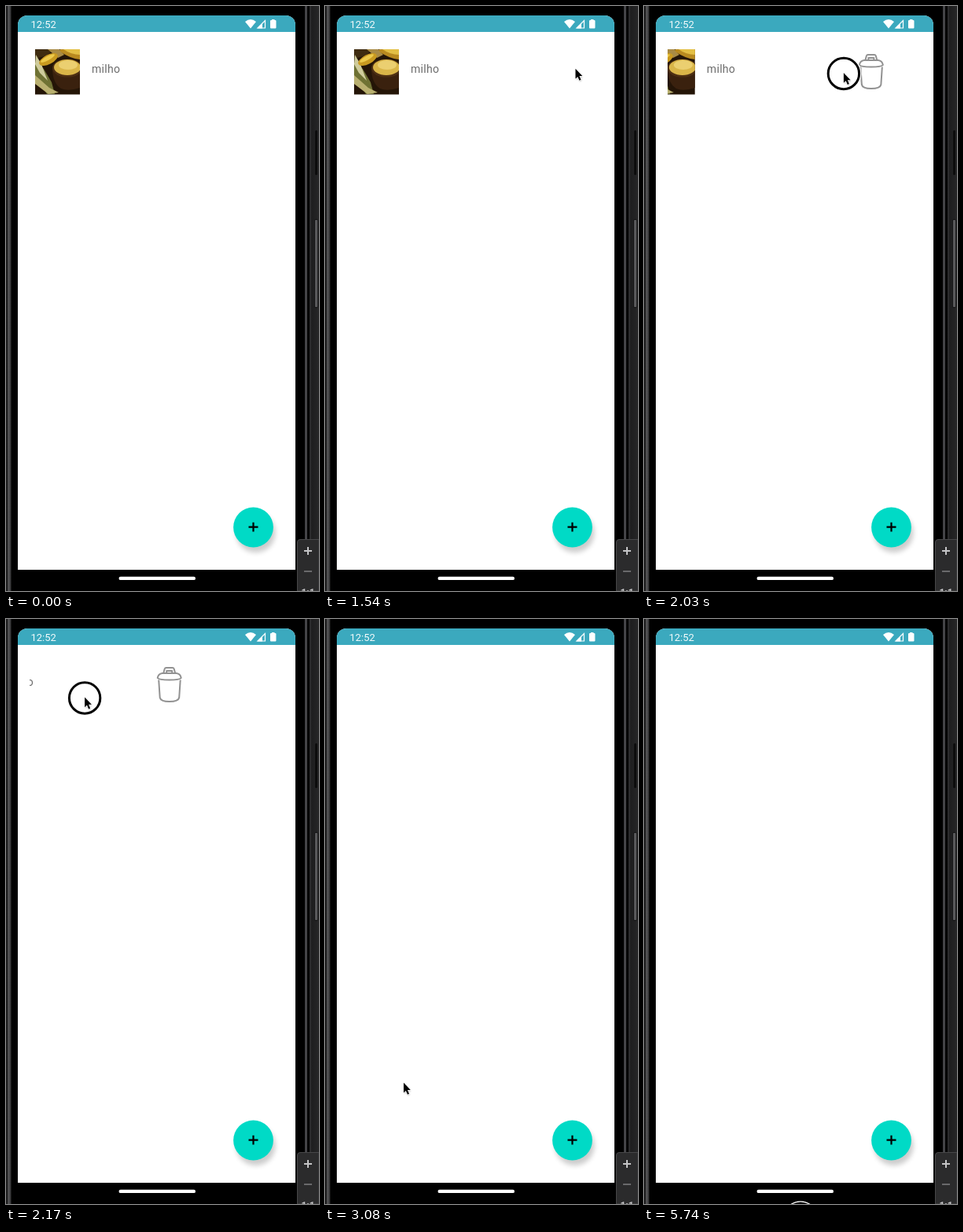
Recreate the animation shown at these times as an HTML page. Size 398 by 744 pixels, loop 5.81 s.

```html
<!DOCTYPE html>
<html lang="pt">
<head>
<meta charset="utf-8">
<title>Swipe to delete</title>
<style>
html, body { margin: 0; width: 100%; height: 100%; overflow: hidden; background: #000; }
svg { display: block; width: 398px; height: 744px; }
text { font-family: Roboto, sans-serif; }
</style>
</head>
<body>
<svg viewBox="0 0 398 744">
  <defs>
    <linearGradient id="metal">
      <stop offset="0" stop-color="#2c2c2e"/>
      <stop offset=".2" stop-color="#111"/>
      <stop offset=".4" stop-color="#59595b"/>
      <stop offset=".75" stop-color="#434345"/>
      <stop offset="1" stop-color="#0c0c0c"/>
    </linearGradient>
    <linearGradient id="side">
      <stop offset="0" stop-color="#333335"/>
      <stop offset=".25" stop-color="#1e1e1f"/>
      <stop offset="1" stop-color="#262627"/>
    </linearGradient>
    <filter id="blur" x="-30%" y="-30%" width="160%" height="160%"><feGaussianBlur stdDeviation="3"/></filter>
    <filter id="soft" x="-50%" y="-50%" width="200%" height="200%"><feGaussianBlur stdDeviation="1"/></filter>
    <clipPath id="list"><rect x="30" y="50" width="323" height="64"/></clipPath>
    <clipPath id="photo"><rect x="37" y="55" width="57" height="57.5"/></clipPath>
  </defs>

  <!-- phone body -->
  <rect width="398" height="744"/>
  <rect width="7" height="744" fill="url(#metal)"/>
  <rect x="380" width="3" height="744" fill="#444447"/>
  <rect x="386" width="12" height="744" fill="url(#side)"/>
  <rect x="393" y="158" width="3" height="57" rx="1.5" fill="#0c0c0c"/>
  <rect x="392.500" y="271" width="4" height="113" rx="1.5" fill="#111"/>
  <rect x="393" y="272" width="3" height="111" rx="1" fill="#59595b"/>

  <!-- screen -->
  <path d="M15 717V24a12 12 0 0 1 12-12H356a12 12 0 0 1 12 12V717Z" fill="#fff"/>
  <path d="M15 33V24a12 12 0 0 1 12-12H356a12 12 0 0 1 12 12V33Z" fill="#3ba9be"/>
  <text x="31.500" y="28" font-size="13" fill="#f2fafb">12:52</text>
  <g fill="#fff">
    <path d="M304 20Q311 14 318 20L311 28.500Z"/>
    <path d="M320 28L329.500 18.500V28Z" fill="none" stroke="#fff" stroke-width="1.200"/>
    <path d="M319.500 28.500L326 22V28.500Z"/>
    <path d="M338 17H341.500V18H342.500Q343.500 18 343.500 19V27.500Q343.500 28.500 342.500 28.500H337Q336 28.500 336 27.500V19Q336 18 337 18H338Z"/>
  </g>
  <rect x="143.500" y="725.700" width="97.500" height="4.400" rx="2.200" fill="#fff"/>

  <!-- list row -->
  <g clip-path="url(#list)">
    <g id="row">
      <g clip-path="url(#photo)">
        <rect x="37" y="55" width="57" height="58" fill="#241507"/>
        <path d="M37 55H60L52 63 37 67Z" fill="#3f2c10"/>
        <path d="M53 55H68L74 62 66 66Z" fill="#a98b45"/>
        <path d="M69 55H94V68Q82 67 69 58Z" fill="#b98a20"/>
        <path d="M73 55H94V62Q83 62 73 55Z" fill="#e3bf45"/>
        <path d="M37 72L48 80 58 97 62 112H52L44 98 37 92Z" fill="#6f7234"/>
        <path d="M37 88L55 104 67 110 54 112 37 99Z" fill="#b9b070"/>
        <path d="M38 62L45 74 53 95 43 85 37 74Z" fill="#cfcc9c"/>
        <ellipse cx="54" cy="68" rx="13" ry="6" transform="rotate(-28 54 68)" fill="#c99a20"/>
        <ellipse cx="53" cy="66.500" rx="10" ry="2.500" transform="rotate(-28 53 66.500)" fill="#edca4b"/>
        <path d="M59 79Q59 98 70 105Q79 109 94 104V78Z" fill="#3a210e"/>
        <ellipse cx="78" cy="79" rx="19" ry="11.500" fill="#4d2f13"/>
        <ellipse cx="78" cy="78" rx="17" ry="10" fill="#d9b548"/>
        <ellipse cx="79" cy="75" rx="12" ry="6" fill="#ebcf70"/>
      </g>
      <text x="109" y="85" font-size="14" letter-spacing=".3" fill="#6c6c6c">milho</text>
      <g id="bin" fill="none" stroke="#929292" stroke-width="2" stroke-linejoin="round">
        <path d="M304.500 77.500L306 100Q307 105 318 105Q329.500 105 330.500 100L332 77.500"/>
        <path d="M303 75Q304 69.500 309 69H327Q332 69.500 333 75Q331 77.500 318 77.500Q305 77.500 303 75Z"/>
        <path d="M310.500 69L312 63.500Q312.500 62 314 62H322Q323.500 62 324 63.500L325.500 69M314.500 69V66H321.500V69"/>
      </g>
    </g>
  </g>

  <!-- add button -->
  <circle cx="317.500" cy="670" r="25" fill="#000" opacity=".2" filter="url(#blur)"/>
  <circle cx="314.500" cy="663" r="25.400" fill="#00dac6"/>
  <path d="M308.500 662.600H320.500M314.500 656.800V668.600" stroke="#000" stroke-width="2.200"/>

  <!-- emulator toolbar -->
  <path d="M370.500 744V682Q370.500 678.500 374 678.500H398V744Z" fill="#2b2b2c" stroke="#474749"/>
  <path d="M379 693H389M384 688V698" stroke="#c4c4c6" stroke-width="2"/>
  <path d="M379 719H389" stroke="#69696b" stroke-width="2"/>
  <text x="384" y="749.500" font-size="12" font-weight="700" text-anchor="middle" fill="#c4c4c6">1:1</text>

  <g id="pointer">
    <g id="press" fill="none">
      <circle cy="1.700" r="20" stroke="#fff" stroke-width="5"/>
      <circle cy="1.700" r="19.700" stroke="#000" stroke-width="3"/>
    </g>
    <path d="M0 0V14L3.200 11.200 5.500 16.500 7.800 15.500 5.500 10.300H9.800Z" transform="translate(.5 2) scale(.9)" opacity=".4" filter="url(#soft)"/>
    <path d="M0 0V14L3.200 11.200 5.500 16.500 7.800 15.500 5.500 10.300H9.800Z" transform="translate(0 .8) scale(.9)" stroke="#fff" stroke-width="1.600" paint-order="stroke"/>
  </g>
</svg>
<script>
const LOOP = 5810, STEP = 70;
const $ = id => document.getElementById(id);
const line = u => u;
const out = u => 1 - (1 - u) ** 2;
const smooth = u => u * u * (3 - 2 * u);
const cubic = u => u < .5 ? 4 * u ** 3 : 1 - 4 * (1 - u) ** 3;

// start, end, from x, y, to x, y, easing
const moves = [
  [70, 630, 215, 640, 300, 103, out],
  [630, 840, 300, 103, 304, 86, line],
  [1120, 1540, 304, 86, 318.5, 79, line],
  [1750, 1820, 318.5, 79, 310, 79, line],
  [1820, 2380, 310, 79, 44, 104, cubic],
  [2380, 2520, 44, 104, 59, 134, line],
  [2520, 3010, 59, 134, 94.5, 570, smooth],
  [3010, 3080, 94.5, 570, 100, 589, line],
  [3080, 3500, 100, 589, 154, 748, line],
  [5740, 5810, 199, 761, 199, 761, line]
];

const progress = (t, a, b) => Math.min(1, Math.max(0, (t - a) / (b - a)));
const show = (id, on) => $(id).setAttribute('visibility', on ? 'inherit' : 'hidden');
const place = (id, x, y) => $(id).setAttribute('transform', `translate(${x} ${y})`);

function draw(time) {
  const t = Math.floor(time % LOOP / STEP) * STEP;
  const move = moves.filter(m => m[0] <= t).pop();
  show('pointer', move);
  if (move) {
    const [a, b, x0, y0, x1, y1, ease] = move;
    const k = ease(progress(t, a, b));
    place('pointer', x0 + (x1 - x0) * k, y0 + (y1 - y0) * k);
  }
  show('press', move && (t >= 1820 && t < 2310 || t >= 5740));

  const swipe = progress(t, 1890, 2380);
  place('row', -323 * swipe ** 1.92, 0);
  show('row', swipe < 1);
  show('bin', swipe > 0 && swipe < 1);
}

const start = performance.now();
function tick() {
  draw(performance.now() - start);
  requestAnimationFrame(tick);
}
draw(0);
requestAnimationFrame(tick);
</script>
</body>
</html>
```
